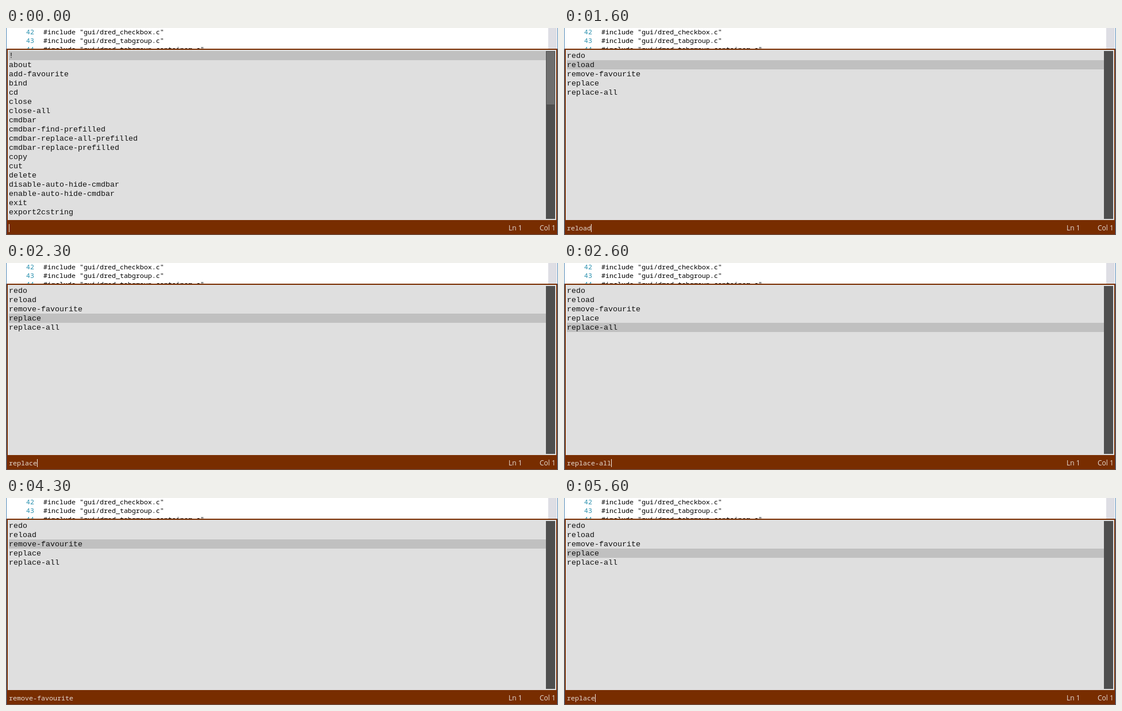
These frames come from a looping animation (960x360 px, 6.1 s). An HTML page:

```html
<!DOCTYPE html>
<html lang="en">
<head>
<meta charset="utf-8">
<title>Command bar</title>
<style>
  html, body { margin: 0; width: 100%; height: 100%; overflow: hidden; background: #fff; }
  svg { display: block; width: 960px; height: 360px; }
  text { white-space: pre; }
  .code { font: 11.67px "Noto Sans Mono", "DejaVu Sans Mono", monospace; }
  .list { font: 13.33px "Liberation Mono", "Courier New", monospace; fill: #111; }
  .status { font: 12px "Open Sans", "Noto Sans", sans-serif; fill: #e6dcd5; }
  .num { fill: #2b91af; }
  .input { fill: #e6dcd5; }
</style>
</head>
<body>
<svg id="stage" viewBox="0 0 960 360"></svg>
<script>
const LOOP = 6100, ROW = 16, TOP = 40, CHAR = 7;
const ALL = ["!", "about", "add-favourite", "bind", "cd", "close", "close-all", "cmdbar",
  "cmdbar-find-prefilled", "cmdbar-replace-all-prefilled", "cmdbar-replace-prefilled",
  "copy", "cut", "delete", "disable-auto-hide-cmdbar", "enable-auto-hide-cmdbar",
  "exit", "export2cstring"];
const MATCHES = ["redo", "reload", "remove-favourite", "replace", "replace-all"];
const CODE = ["checkbox", "tabgroup", "tabgroup_container"];

// [time, input text, selected row, caret shown]
const STEPS = [
  [0, "", 0, true],
  [500, "", 0, false],
  [700, "r", 0, true],
  [1300, "redo", 0, true],
  [1600, "reload", 1, true],
  [1900, "remove-favourite", 2, true],
  [2200, "replace", 3, true],
  [2500, "replace-all", 4, true],
  [3200, "replace", 3, true],
  [3700, "replace", 3, false],
  [3800, "remove-favourite", 2, true],
  [4300, "remove-favourite", 2, false],
  [4400, "replace", 3, true],
  [4900, "replace", 3, false],
  [5400, "replace", 3, true]
];

const stage = document.getElementById("stage");

function add(tag, attrs, parent = stage) {
  const el = document.createElementNS("http://www.w3.org/2000/svg", tag);
  for (const key in attrs) el.setAttribute(key, attrs[key]);
  return parent.appendChild(el);
}
const rect = (x, y, width, height, fill) => add("rect", { x, y, width, height, fill });
function label(x, y, cls, str, parent) {
  const el = add("text", { x, y, class: cls }, parent);
  el.textContent = str;
  return el;
}

// editor behind the panel
rect(0, 0, 960, 360, "#fff");
rect(943, 0, 15, 36, "#dedee4");
CODE.forEach((name, i) => {
  const y = 11 + 15 * i;
  label(35, y, "code num", 42 + i);
  label(65, y, "code", `#include "gui/dred_${name}.c"`);
});
rect(0, 0, 1, 360, "#4f86b5");
rect(959, 0, 1, 360, "#4f86b5");

// command panel
rect(1, 36, 958, 323, "#782d00");
rect(0, 359, 960, 1, "#6c5a55");
rect(3, 38, 954, 296, "#dfdfdf");
const bar = rect(5, TOP, 934, ROW, "#c0c0c0");
rect(939, TOP, 16, 292, "#4f4f4f");
const thumb = rect(940, 41, 14, 92, "#6e6e6e");

function makeList(items) {
  const group = add("g", {});
  items.forEach((item, i) => label(5, TOP + 12 + ROW * i, "list", item, group));
  return group;
}
const allList = makeList(ALL), matchList = makeList(MATCHES);

const input = label(5, 352, "code input", "");
const caret = rect(5, 341, 1, 14, "#f0e8e2");
label(874, 352, "status", "Ln 1");
label(928, 352, "status", "Col 1");

const show = (el, on) => el.setAttribute("visibility", on ? "visible" : "hidden");
let shown = null;

function draw(now) {
  const t = now % LOOP;
  const step = STEPS.findLast(s => s[0] <= t);
  if (step !== shown) {
    shown = step;
    const [, str, row, blink] = step;
    input.textContent = str;
    bar.setAttribute("y", TOP + ROW * row);
    caret.setAttribute("x", 5 + CHAR * str.length);
    show(caret, blink);
    show(allList, !str);
    show(thumb, !str);
    show(matchList, str);
  }
  requestAnimationFrame(tick);
}
const start = performance.now();
function tick() { draw(performance.now() - start); }
tick();
</script>
</body>
</html>
```
